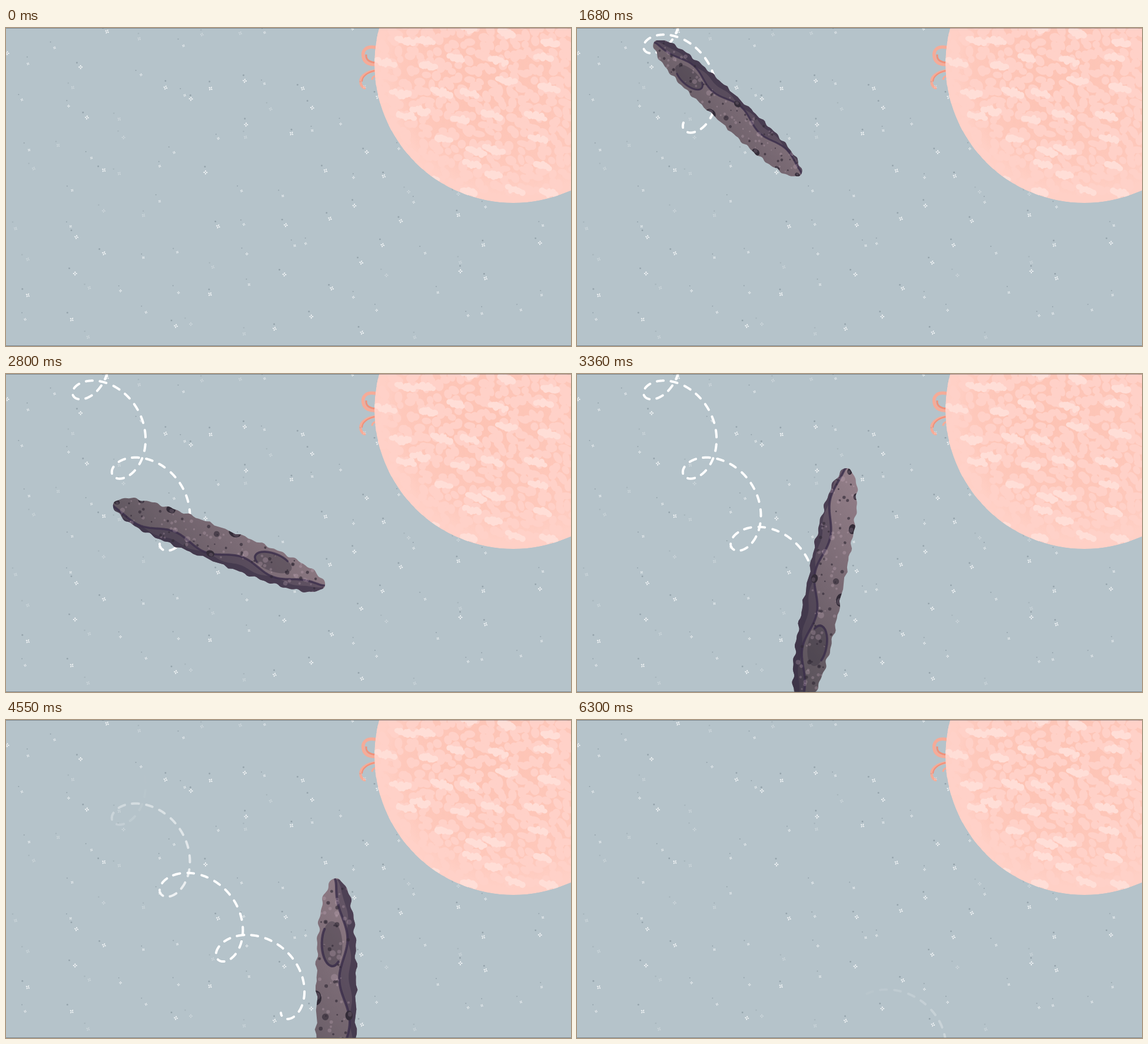
Recreate the animation shown at these times as an HTML page with a canvas. Size 960 px wide and 540 px high, loop 6370 ms.

```html
<!DOCTYPE html>
<html lang="en">
<head>
<meta charset="utf-8">
<title>Tumbling rock</title>
<style>
  html, body { margin: 0; height: 100%; overflow: hidden; background: #b5c3ca; }
  canvas { display: block; width: 100vw; height: 100vh; }
</style>
</head>
<body>
<canvas id="stage" width="960" height="540"></canvas>
<script>
const W = 960, H = 540, LOOP = 6370, STEP = 70, TAU = Math.PI * 2, DEG = Math.PI / 180;
const SUN = { x: 862, y: 61, r: 236 };
const stage = document.getElementById('stage').getContext('2d');

let seed = 7;
const rnd = (a = 0, b = 1) => {
  seed = (seed * 16807) % 2147483647;
  return a + (b - a) * seed / 2147483647;
};
const range = (from, to, step, fn) =>
  Array.from({ length: Math.floor((to - from) / step) + 1 }, (_, i) => fn(from + i * step));

function trace(g, pts) {
  g.beginPath();
  pts.forEach(([x, y]) => g.lineTo(x, y));
}

function ellipse(g, x, y, rx, ry, color, turn = 0) {
  g.fillStyle = color;
  g.beginPath();
  g.ellipse(x, y, rx, ry, turn, 0, TAU);
  g.fill();
}

// calls fn at the jittered nodes of a grid
function scatter(x0, y0, x1, y1, dx, dy, jitter, fn) {
  for (let y = y0; y < y1; y += dy) {
    for (let x = x0; x < x1; x += dx) {
      fn(x + rnd(-jitter, jitter) * dx, y + rnd(-jitter, jitter) * dy);
    }
  }
}

// ---- Sky and sun, painted once ----
function drawStar(g, x, y) {
  const kind = rnd(), faint = kind > 0.78;
  const size = kind < 0.4 ? 3.4 : faint ? 3 : 2.3;
  const turn = rnd(0, 0.7), alpha = faint ? 0.35 : 0.85;
  g.globalAlpha = alpha * 0.8;
  ellipse(g, x - rnd(0, 10), y - rnd(6, 12), size * 0.42, size * 0.42, '#84939c');
  g.globalAlpha = alpha;
  g.strokeStyle = '#fff';
  g.lineWidth = size * 0.5;
  g.beginPath();
  for (let k = 0; k < 4; k++) {
    const c = Math.cos(turn + k * TAU / 4), s = Math.sin(turn + k * TAU / 4);
    g.moveTo(x + c * size * 0.3, y + s * size * 0.3);
    g.lineTo(x + c * size, y + s * size);
  }
  g.stroke();
  g.globalAlpha = 1;
}

function drawFlares(g) {
  const flare = (d, width, color) => {
    g.lineWidth = width;
    g.strokeStyle = color;
    g.stroke(new Path2D(d));
  };
  flare('M628 33C612 30 605 38 607 49C609 60 619 63 630 62', 5.5, '#f5ab98');
  flare('M612 45C611 54 617 58 629 59', 3, '#f09079');
  flare('M630 72C609 74 600 85 603 95C605 101 608 102 611 102', 4.5, '#f5ab98');
  flare('M629 72C613 75 605 83 605 91', 2, '#f09079');
  flare('M629 81C624 82 622 84 622 88', 3, '#f5ab98');
}

function drawCloud(g, x, y) {
  const wide = rnd(10, 15);
  for (let k = -3; k <= 3; k++) {
    ellipse(g, x + k / 3 * wide, y + k + rnd(-2.5, 2.5), rnd(4, 6.5), rnd(4, 9 - Math.abs(k)), '#ffded7', 0.2);
  }
}

function drawSun(g) {
  const { x, y, r } = SUN;
  g.save();
  g.beginPath();
  g.arc(x, y, r, 0, TAU);
  g.clip();
  const warm = g.createRadialGradient(790, 95, 10, x, y, r - 12);
  warm.addColorStop(0, '#fdc3b4');
  warm.addColorStop(0.75, '#fec8bb');
  warm.addColorStop(1, '#ffd0c6');
  ellipse(g, x, y, r, r, warm);
  scatter(635, 0, W + 10, 285, 17, 13, 0.5, (bx, by) =>
    ellipse(g, bx, by, rnd(6, 11), rnd(5, 8), '#ffd1c8', rnd(0, 1.6)));
  scatter(660, 15, W + 10, 290, 62, 45, 0.35, (cx, cy) => drawCloud(g, cx, cy));
  g.restore();
}

const sky = document.createElement('canvas');
sky.width = W;
sky.height = H;
{
  const g = sky.getContext('2d');
  g.fillStyle = '#b5c3ca';
  g.fillRect(0, 0, W, H);
  drawFlares(g);
  scatter(30, 20, W, H, 62, 60, 0.45, (x, y) => drawStar(g, x, y));
  drawSun(g);
}

// ---- Dashed trail: a circle rolling along a gently bending path ----
const trail = range(-0.4, 5.3, 0.003, turn => {
  const angle = (156 + 353 * turn) * DEG;
  return [
    155 + 58 * turn + 7 * turn ** 2 + 45 * Math.cos(angle),
    18 + 137 * turn - 6 * turn ** 2 + 45 * Math.sin(angle),
    turn
  ];
});
const dashes = [];
trail.reduce((length, p, i) => {
  const [x, y] = trail[Math.max(0, i - 1)];
  length += Math.hypot(p[0] - x, p[1] - y);
  if (length % 24 < 12.5) (dashes[Math.floor(length / 24)] ||= []).push(p);
  return length;
}, 0);

function drawTrail(g, t) {
  const head = 0.5 + (t - 1120) * 0.00104;
  const tail = -0.6 + (t - 3990) * 0.00206;
  g.lineWidth = 4;
  g.lineCap = 'round';
  g.strokeStyle = '#fff';
  for (const dash of dashes) {
    const shown = dash.filter(p => p[2] < head);
    const alpha = (dash[0][2] - tail) * 0.6;
    if (shown.length < 2 || alpha <= 0) continue;
    g.globalAlpha = Math.min(1, alpha);
    trace(g, shown);
    g.stroke();
  }
  g.globalAlpha = 1;
}

// ---- Rock, in its own frame with the long axis along x ----
const HALF = 217;
const taper = x => Math.sqrt(Math.max(0, 1 - Math.abs(x / HALF) ** 3.5));
const outline = range(0, 360, 1, a => {
  const c = Math.cos(a * DEG), s = Math.sin(a * DEG);
  const x = HALF * Math.sign(c) * Math.abs(c) ** 0.57;
  const bump = Math.sin(x * 0.17 + s * 2) * 1.4 + Math.sin(x * 0.29 - s) * 1.1;
  return [x, 33 * s + 0.02 * x + bump];
});
const lengthwise = fn => range(-HALF, HALF, 3, x => [x, fn(x) * taper(x)]);
const ridge = lengthwise(x => 14 + 8 * Math.cos((x + 20) * TAU / 140));
const crease = lengthwise(x => 24 + 2.5 * Math.sin(x * 0.09));
const pits = [[20, -33, 12], [-110, -31, 9], [-169, -27, 6], [-10, 21, 8], [-212, -8, 6]];
const specks = range(0, 115, 1, i =>
  ({ x: rnd(-200, 200), y: rnd(-27, 25), r: rnd(1.3, i % 4 ? 3.2 : 6), dark: i % 5 < 2 }));

function drawRock(g, t) {
  const s = (t - 1120) / 1000;
  const turn = (142 + s * 142) * DEG;
  const scale = (154 + 26 * s - 1.7 * s * s) / HALF;
  g.save();
  g.translate(209 + 80 * s + 6.6 * s * s, 52 + 155 * s - 7.8 * s * s);
  g.rotate(turn);
  g.scale(scale, scale);
  trace(g, outline);
  g.clip();

  // light always comes from the upper right of the stage
  const lx = Math.cos(-0.7 - turn) * 175, ly = Math.sin(-0.7 - turn) * 175;
  const light = g.createLinearGradient(-lx, -ly, lx, ly);
  light.addColorStop(0, '#544e56');
  light.addColorStop(0.5, '#766771');
  light.addColorStop(1, '#95808a');
  g.fillStyle = light;
  g.fillRect(-240, -60, 480, 120);

  g.fillStyle = 'rgba(50,40,65,.45)';
  for (const line of [ridge, crease]) {
    trace(g, [...line, [HALF, 60], [-HALF, 60]]);
    g.fill();
  }
  ellipse(g, 108, -5, 38, 17, 'rgba(50,45,60,.38)');
  g.strokeStyle = 'rgba(58,46,74,.8)';
  g.lineWidth = 4;
  g.beginPath();
  g.ellipse(108, -5, 36, 17, 0, Math.PI * 0.8, Math.PI * 1.75);
  g.stroke();
  trace(g, ridge);
  g.stroke();
  for (const { x, y, r, dark } of specks) {
    ellipse(g, x, y, r, r, dark ? 'rgba(52,43,56,.65)' : 'rgba(205,180,195,.25)');
  }
  for (const [x, y, r] of pits) {
    ellipse(g, x, y, r, r * 0.75, '#332c38');
    ellipse(g, x + r * 0.25, y + r * 0.2, r * 0.5, r * 0.4, 'rgba(110,95,110,.5)');
  }
  g.restore();
}

function frame(now) {
  const t = Math.floor((now % LOOP) / STEP) * STEP;
  stage.drawImage(sky, 0, 0);
  if (t >= 280) {
    drawTrail(stage, t);
    drawRock(stage, t);
  }
  stage.fillStyle = 'rgba(70,78,84,.5)';
  stage.fillRect(0, 0, W, 1);
  stage.fillRect(0, H - 1, W, 1);
  requestAnimationFrame(frame);
}
requestAnimationFrame(frame);
</script>
</body>
</html>
```
